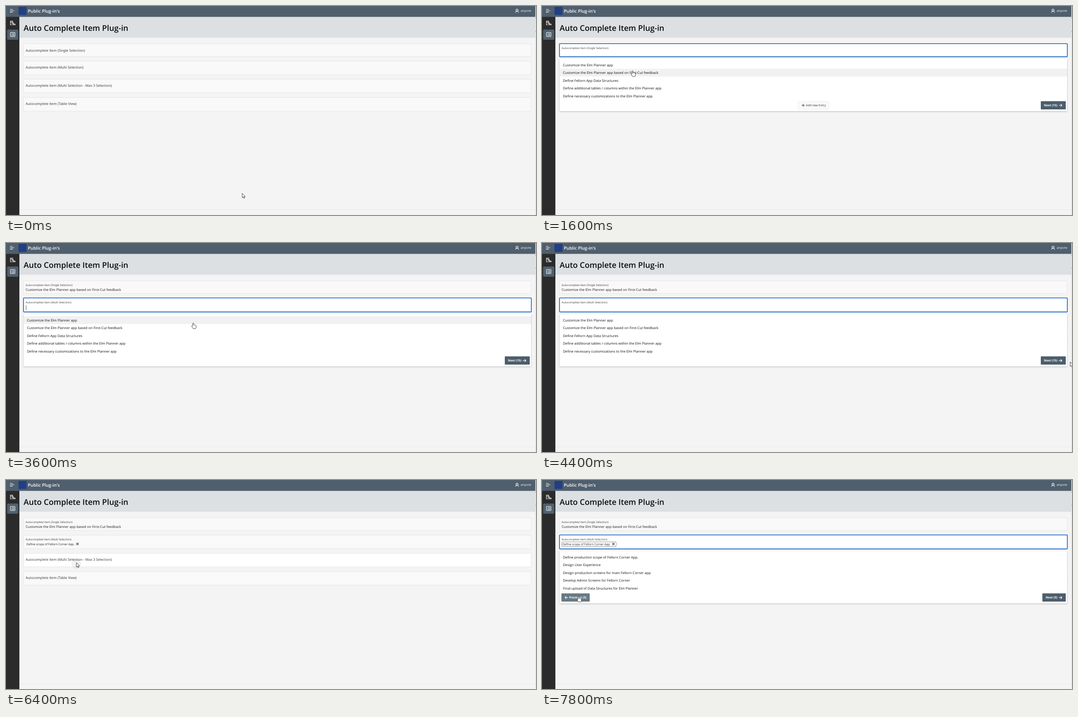
An HTML page for the animation above (8000 ms loop, 1189x471 px).

```html
<!DOCTYPE html>
<html lang="en">
<head>
<meta charset="utf-8">
<title>Auto Complete Item Plug-in</title>
<style>
  html, body { margin: 0; width: 100%; height: 100%; overflow: hidden; background: #f4f4f4; }
  svg { display: block; width: 1189px; height: 471px; font-family: "Open Sans", "Noto Sans", sans-serif; text-rendering: geometricPrecision; }
  .popup { filter: drop-shadow(0 1px 1.6px rgba(0, 0, 0, .25)); }
  .icon { fill: none; stroke: #fff; stroke-width: 1.1; }
</style>
</head>
<body>
<svg viewBox="0 0 1189 471">
  <rect width="1189" height="471" fill="#f4f4f4"/>
  <rect x="30" y="24" width="1158" height="47.5" fill="#dce0e3"/>
  <rect y="24" width="30" height="447" fill="#2b2b2b"/>
  <rect width="1188" height="24.5" fill="#505f6d"/>
  <rect x="30" y="459" width="1158" height="1" fill="#e8e8e8"/>
  <rect x="1187.6" width="1.4" height="471" fill="#e3e3e3"/>
  <path d="M1188 27h1M1188 57h1" stroke="#777" stroke-width="1.5"/>
  <path class="icon" d="M9 7.7h6M9 10.8h9.5M9 13.9h6" stroke-width="1.2"/>
  <rect x="28" y="2" width="18" height="18" fill="#213f83"/>
  <rect x="2.5" y="53" width="25" height="23" rx="2" fill="#50606e"/>
  <path class="icon" d="M13 42.5H10v-8.500h5v4M10 36h4M12 38.500h3v2.500M15 38h2v4.500h-3M17.500 40.500h3v2h-3"/>
  <rect class="icon" x="10" y="59.5" width="10" height="9.500" rx="1"/>
  <path class="icon" d="M12 62h1M14 62h4M12 64.300h1M14 64.300h4M12 66.600h1M14 66.600h4" stroke-width=".9"/>
  <circle class="icon" cx="1146.500" cy="9.300" r="2.300" stroke-width=".9"/>
  <path class="icon" d="M1143.200 15c0-4.400 6.600-4.400 6.600 0" stroke-width=".9"/>
  <text x="49" y="14.700" font-size="9.950" font-weight="600" fill="#fff">Public Plug-in's</text>
  <text x="1154.700" y="13.400" font-size="6.800" fill="#fff">anyone</text>
  <text x="39.500" y="55.500" font-size="17.700" font-weight="600" fill="#0c0c0c">Auto Complete Item Plug-in</text>
  <g id="scene"></g>
</svg>
<script>
const scene = document.getElementById('scene');
const STEP = 200, LOOP = 8000, DROP = 41.1, PITCH = 17.45;

const fields = [
  { name: 'Single Selection', y: 85, h: 29, text: 102.6 },
  { name: 'Multi Selection', y: 124, h: 31, text: 140.7 },
  { name: 'Multi Selection - Max 3 Selection', y: 165, h: 31, text: 181.6 },
  { name: 'Table View', y: 206, h: 31, text: 222.8 },
];
const firstPage = [
  'Customize the Elm Planner app',
  'Customize the Elm Planner app based on First-Cut feedback',
  'Define Fellorn App Data Structures',
  'Define additional tables / columns within the Elm Planner app',
  'Define necessary customizations to the Elm Planner app',
];
const secondPage = [
  'Define production scope of Fellorn Corner App.',
  'Define scope of Fellorn Corner App.',
  'Design User Experience',
  'Design production screens for main Fellorn Corner app',
  'Develop Admin Screens for Fellorn Corner',
  'Final upload of Data Structures for Elm Planner',
];

// pointer stops: step, x, y
const path = [
  [0, 530, 422], [1, 420, 100], [2, 420, 100], [3, 900, 190], [4, 1179, 224], [5, 700, 186],
  [6, 200, 146], [7, 203, 146], [10, 204, 146], [13, 204, 140], [16, 204, 140], [18, 420, 180],
  [21, 1100, 262], [22, 1185, 268], [23, 1150, 263], [25, 1146, 263], [26, 640, 212],
  [27, 314, 187], [28, 225, 188], [29, 158, 186], [32, 158, 186], [33, 190, 148],
  [35, 205, 140], [36, 214, 139], [37, 140, 267], [38, 84, 262.5], [39, 82, 262],
];
const clicks = [2, 10, 15, 24, 31, 32, 34];

const text = (x, y, size, str, fill = '#1c1c1c', extra = '') =>
  `<text x="${x}" y="${y}" font-size="${size}" fill="${fill}" ${extra}>${str}</text>`;
const rect = (x, y, w, h, fill, extra = '') =>
  `<rect x="${x}" y="${y}" width="${w}" height="${h}" fill="${fill}" ${extra}/>`;
const line = (d, stroke, width) =>
  `<path d="${d}" fill="none" stroke="${stroke}" stroke-width="${width}"/>`;
const inside = (p, x, y, w, h) => p.x >= x && p.x <= x + w && p.y >= y && p.y <= y + h;

function pointerAt(k) {
  const i = path.findIndex(s => s[0] >= k);
  const b = path[i], a = path[Math.max(0, i - 1)];
  const u = b[0] === a[0] ? 0 : (k - a[0]) / (b[0] - a[0]);
  return { x: a[1] + (b[1] - a[1]) * u, y: a[2] + (b[2] - a[2]) * u };
}

function stateAt(k) {
  const between = (a, b) => k >= a && k < b;
  return {
    k,
    pointer: pointerAt(k),
    focus: between(2, 10) ? 0 : between(15, 31) || k >= 34 ? 1 : -1,
    open: between(2, 10) ? 0 : between(16, 31) || k >= 35 ? 1 : -1,
    page: k >= 25 ? 1 : 0,
    value: k >= 10,
    chip: k >= 31,
  };
}

function drawField(f, i, s) {
  const focused = s.focus === i;
  const hover = s.open < 0 && inside(s.pointer, 39, f.y, 1139, f.h);
  const filled = (i === 0 && s.value) || (i === 1 && s.chip);
  let out = focused
    ? rect(39.3, f.y - .2, 1139.2, f.h + .6, '#fff', 'rx="1" stroke="#0b5cc4" stroke-width="1.6"')
    : rect(39.5, f.y + .3, 1138.5, f.h - .5, hover ? '#fff' : '#f9f9f9', 'rx="1" stroke="#e5e5e5" stroke-width=".9"');
  const label = `Autocomplete Item (${f.name})`;
  out += focused || filled
    ? text(44, f.y + 11.5, 6.16, label, '#3a3a3a')
    : text(44, f.text, 7.8, label, '#333');
  if (i === 0 && s.value) out += text(44, 108.4, 7.7, firstPage[1]);
  if (i === 1 && s.chip) {
    if (focused) out += rect(44.3, 139.5, 122, 10, '#fff', 'rx="1" stroke="#777" stroke-width=".8"');
    out += text(46, 146.8, 6.5, secondPage[1]) + line('M157.7 141.700l5 5m0-5l-5 5', '#222', 1.1);
  }
  if (focused && (s.k + 1) % 6 < 3)
    out += rect(i === 1 && s.chip ? 170 : 44.7, f.y + 16, .8, 11, '#333');
  return out;
}

function drawPopup(s) {
  const dy = s.open * DROP, p = s.pointer, top = 214.5 + dy;
  const rows = (s.page ? secondPage.filter((r, i) => !s.chip || i !== 1) : firstPage).slice(0, 5);
  let hot = false;
  const touch = (x, y, w, h) => {
    const hit = inside(p, x, y, w, h);
    hot = hot || hit;
    return hit;
  };
  let out = rect(39.5, 119 + dy, 1138.5, 118, '#fff', 'class="popup"');
  rows.forEach((row, i) => {
    const y = 124 + dy + i * PITCH;
    if (touch(40, y, 1138, PITCH)) out += rect(39.5, y, 1138.5, PITCH, '#f1f1f1');
    out += text(47, y + 11.8, 7.7, row, '#111');
  });
  const button = (x, w) => rect(x, top, w, 18.5, touch(x, top, w, 18.5) ? '#687985' : '#4c5d6b', 'rx="1"');
  const mid = top + 9.3, base = top + 11.7, bold = 'font-weight="700"';
  if (s.page) {
    out += button(43.5, 63.5) + line(`M58.500 ${mid}h-7m3-3l-3 3l3 3`, '#fff', 1.1);
    out += text(61, base, 6.7, 'Previous (5)', '#fff', bold);
  }
  if (s.open === 0) {
    touch(574, top, 70, 18.5);
    out += rect(574.3, top + .3, 69.4, 18, '#f9f9f9', 'rx="1" stroke="#ececec" stroke-width=".8"');
    out += line(`M582.500 ${mid}h7m-3.500-3.500v7`, '#333', 1) + text(592, base, 6.65, 'Add new Entry', '#333');
  }
  const left = s.page ? (s.chip ? 9 : 10) : 15;
  const w = left > 9 ? 56 : 52.5;
  out += button(1175 - w, w) + line(`M1159.500 ${mid}h7m-3-3l3 3l-3 3`, '#fff', 1.1);
  out += text(1156, base, 6.7, `Next (${left})`, '#fff', bold + ' text-anchor="end"');
  return { out, hot };
}

function drawPointer(p, hand) {
  const d = hand
    ? 'M-1.200 7V1Q0-.8 1.200 1V4.500Q2.500 3.600 3.200 5Q4.600 4.300 5.200 5.600Q6.500 5.200 6.500 7V9.500Q6 11 5.200 13H0Q-1.500 10.500-3.600 8Q-3.500 6-1.200 7Z'
    : 'M0 0V10.200L2.300 8.100L3.900 11.600L5.500 10.900L4 7.500H7Z';
  return `<path transform="translate(${p.x} ${p.y})" d="${d}" fill="#fff" stroke="#222" stroke-width=".85" stroke-linejoin="round"/>`;
}

function render(k) {
  const s = stateAt(k);
  const popup = s.open >= 0 ? drawPopup(s) : { out: '', hot: false };
  const halo = clicks.includes(k)
    ? `<circle cx="${s.pointer.x}" cy="${s.pointer.y + 3}" r="11" fill="#000" opacity=".05"/>` : '';
  scene.innerHTML = fields.map((f, i) => drawField(f, i, s)).join('') +
    popup.out + halo + drawPointer(s.pointer, popup.hot);
}

const start = performance.now();
let shown = -1;
function tick() {
  const k = Math.floor(((performance.now() - start) % LOOP) / STEP);
  if (k !== shown) render(shown = k);
  requestAnimationFrame(tick);
}
tick();
</script>
</body>
</html>
```
